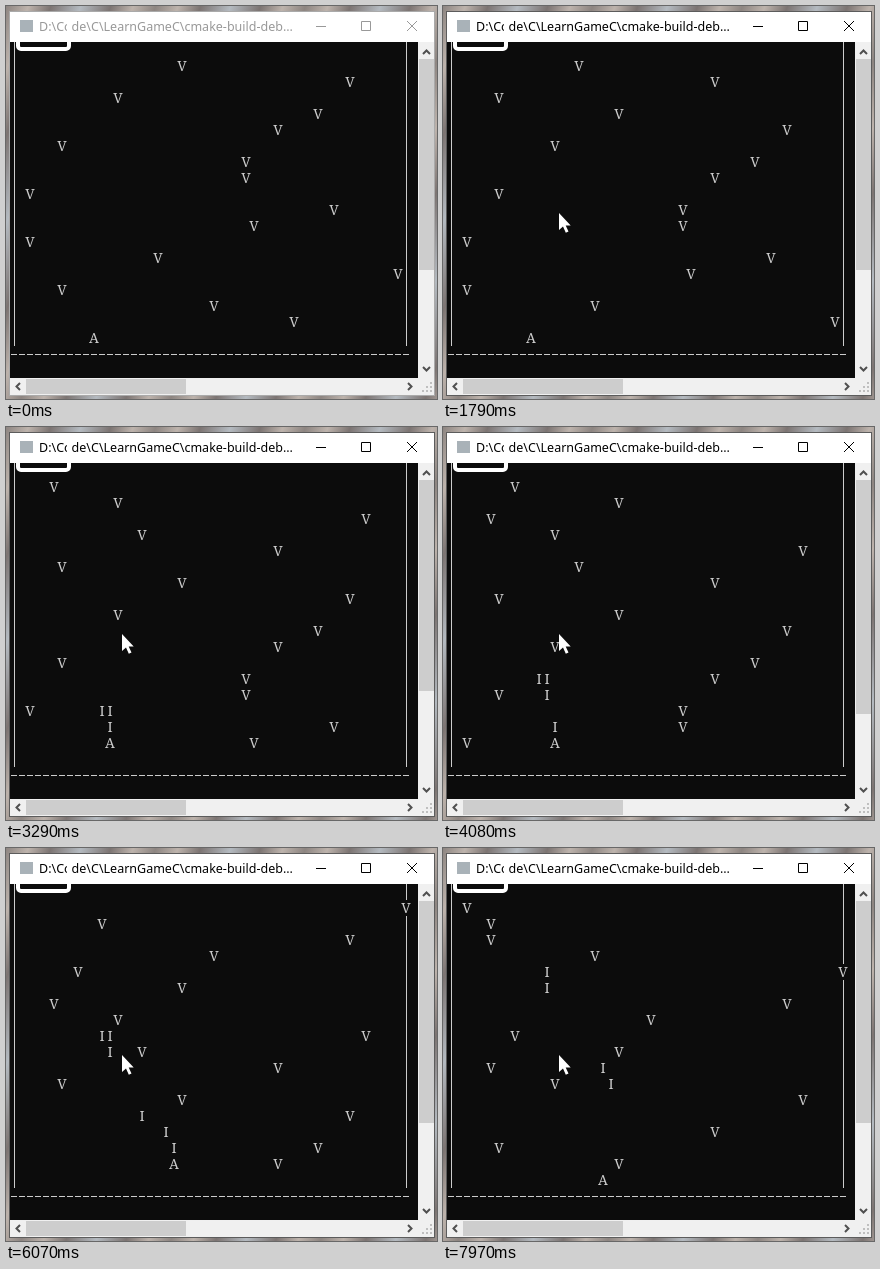
Animation, 431 px wide and 393 px high, one loop 8000 ms. Source, as an HTML page:

```html
<!DOCTYPE html>
<html lang="en">
<head>
<meta charset="utf-8">
<title>Console shooter</title>
<style>
html, body { margin: 0; width: 100%; height: 100%; overflow: hidden; background: #a39c98; }
svg { display: block; width: 431px; height: 393px; }
.title { font: 12.5px "Noto Sans", "Open Sans", sans-serif; fill: var(--ink); }
.buttons { fill: none; stroke: var(--ink); }
.arrows { fill: none; stroke: #505050; stroke-width: 2; }
#window { --ink: #999; --edge: #aaa; }
#window.active { --ink: #000; --edge: #5c5c5c; }
#pieces { font: 300 14px "Noto Serif", "Liberation Serif", serif; font-stretch: 62.5%; fill: #ccc; text-anchor: middle; }
</style>
</head>
<body>
<svg viewBox="0 0 431 393">
  <defs>
    <linearGradient id="stone" x2="67" y2="23" gradientUnits="userSpaceOnUse" spreadMethod="reflect">
      <stop offset="0" stop-color="#8d8581"/>
      <stop offset=".3" stop-color="#bdb3ac"/>
      <stop offset=".6" stop-color="#7c7472"/>
      <stop offset="1" stop-color="#b4bac0"/>
    </linearGradient>
  </defs>
  <rect width="431" height="393" fill="url(#stone)"/>

  <g id="window">
    <rect x="3.5" y="5.5" width="425" height="384" fill="#fff" stroke="var(--edge)"/>
    <rect x="14" y="14" width="13" height="12" fill="#a9b2b8"/>
    <text class="title" x="33" y="25">D:\Code\C\LearnGameC\cmake-build-deb...</text>
    <path class="buttons" d="M310 20.5h10M355.5 15.5h9v9h-9zM401 15l10 10M411 15l-10 10"/>

    <rect x="4" y="36" width="408" height="336" fill="#0c0c0c"/>
    <path d="M8.5 36V340M400.5 36V340" stroke="#ccc"/>
    <path d="M5 348.5H404" stroke="#ccc" stroke-dasharray="6 2"/>
    <rect id="gap" x="396" width="8" height="16" fill="#0c0c0c"/>
    <g id="pieces"></g>
    <rect x="12" y="8" width="51" height="35" rx="3" fill="none" stroke="#fff" stroke-width="4"/>

    <path d="M412 36h16v353H4V372H412z" fill="#f0f0f0"/>
    <rect id="vthumb" x="413" y="53" width="15" fill="#cdcdcd"/>
    <rect id="hthumb" x="20" y="373" height="15" fill="#cdcdcd"/>
    <path class="arrows" d="M417 48l3.5-3.5 3.5 3.5M417 361l3.5 3.5 3.5-3.5M14 377l-3.5 3.5 3.5 3.5M402 377l3.5 3.5-3.5 3.5"/>
    <path d="M424 380h2v2h-2zM424 384h2v2h-2zM420 384h2v2h-2zM416 384h2v2h-2zM420 380h2v2h-2zM424 376h2v2h-2z" fill="#bfbfbf"/>
  </g>
  <path id="cursor" d="M116 207v17l4-3.6 2.8 6.4 2.7-1.2-2.8-6.1h5z" fill="#fff"/>
</svg>
<script>
const LOOP = 8000, TICK = 485, LEAD = 10, FOCUS = 700;
const LAST_ROW = 17, WALL_COL = 49;
const $ = id => document.getElementById(id);
const tickAt = t => Math.max(0, Math.floor((t - LEAD) / TICK));
const show = (el, on) => el.style.display = on ? "" : "none";

// Column of each enemy, newest first; every enemy is one row ahead of the next.
const columns = [2, 5, 5, 18, WALL_COL, 11, 42, 25, 8, 21, 5, 13, 44, 16, 33, 6, 21,
  42, 13, 38, 33, 6, 29, 29, 2, 40, 30, 2, 18, 48, 6, 25, 35];
const shotTimes = [2480, 2680, 2990, 3980, 4950, 5700, 5950];

// Clamped walk from one column to another between two times.
const walk = (t, from, to, cells) => cells * Math.min(1, Math.max(0, (t - from) / (to - from)));
const shipCol = t => Math.floor(10 + walk(t, 2300, 2550, 2) + walk(t, 3700, 6100, 9) - walk(t, 7100, 7500, 2));
const shipRow = t => t > 2120 && t < 7660 ? 17 : 18;

function makePiece(letter) {
  const el = document.createElementNS("http://www.w3.org/2000/svg", "text");
  el.textContent = letter;
  return $("pieces").appendChild(el);
}

function place(el, col, row, shown = true) {
  el.setAttribute("x", 8 + col * 8);
  el.setAttribute("y", 49 + row * 16);
  show(el, shown);
}

const newest = tickAt(LOOP);
const enemies = columns.map((col, i) => ({
  el: makePiece("V"), col, dies: Infinity, row: k => k + i + 1 - newest
}));
const bullets = shotTimes.map(time => ({
  el: makePiece("I"), time, col: shipCol(time), dies: Infinity, row: k => 16 + tickAt(time) - k
}));
const ship = makePiece("A");

// A bullet and an enemy in one column vanish as soon as they touch.
for (const b of bullets) {
  for (let k = tickAt(b.time); k <= newest && b.dies === Infinity; k++) {
    const hit = enemies.find(e => {
      const space = b.row(k) - e.row(k);
      return e.col === b.col && e.row(k) > 0 && space >= 0 && space <= 1;
    });
    if (hit) hit.dies = b.dies = k;
  }
}

// The console resizes its scroll range while it redraws.
function drawScroll(t) {
  const step = Math.floor(t / 1300);
  $("vthumb").setAttribute("height", step < 3 ? 211 : step % 2 ? 234 : 222);
  $("hthumb").setAttribute("width", t >= 2580 && t < 2660 ? 375 : 160);
}

function draw(t) {
  const k = tickAt(t);
  show($("gap"), false);
  for (const e of enemies) {
    const row = e.row(k);
    const shown = row >= 1 && row <= LAST_ROW && k < e.dies;
    place(e.el, e.col, row, shown);
    if (shown && e.col === WALL_COL) {
      $("gap").setAttribute("y", 36 + row * 16);
      show($("gap"), true);
    }
  }
  for (const b of bullets) place(b.el, b.col, b.row(k), t >= b.time && k < b.dies);
  place(ship, shipCol(t), shipRow(t));
  drawScroll(t);
  $("window").classList.toggle("active", t >= FOCUS);
  show($("cursor"), t >= FOCUS);
}

const start = performance.now();
function frame(now) {
  draw(Math.max(0, now - start) % LOOP);
  requestAnimationFrame(frame);
}
draw(0);
requestAnimationFrame(frame);
</script>
</body>
</html>
```
